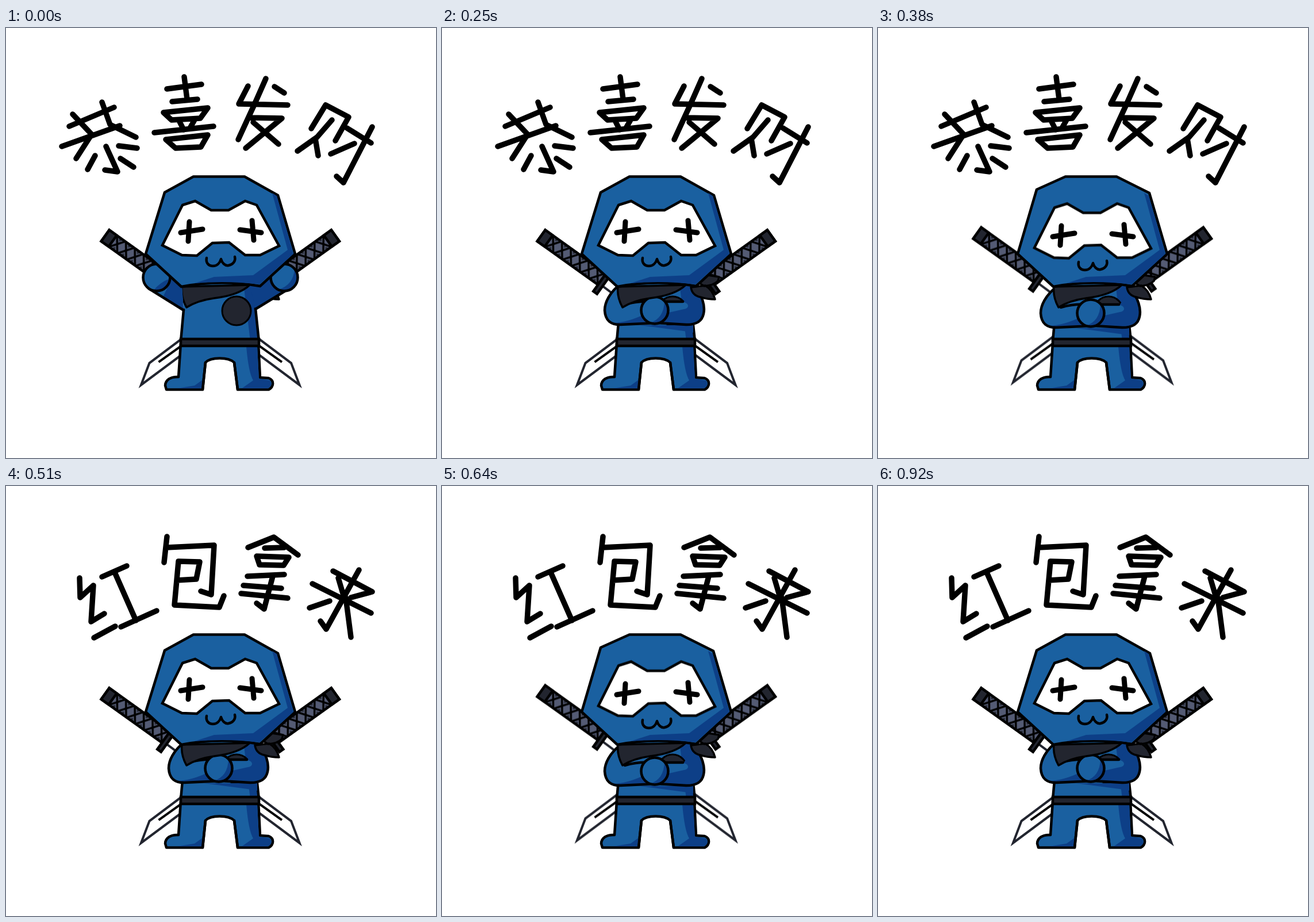
An HTML page that plays this animation: 748 px wide and 748 px high, repeating every 1.02 s.

```html
<!DOCTYPE html>
<html lang="zh">
<head>
<meta charset="utf-8">
<title>恭喜发财</title>
<style>
  html, body { margin: 0; width: 100%; height: 100%; overflow: hidden; background: #fff; }
  svg { display: block; width: 100vw; height: 100vh; }

  .blue { fill: #1a60a0; }
  .navy { fill: #0d3f87; stroke: none; }
  .dark { fill: #22252f; }
  .white { fill: #fff; }
  .line { fill: none; }
  .ink { stroke: #000; stroke-width: 4.5; stroke-linejoin: round; stroke-linecap: round; }
  .bare { stroke: none; }
  .sharp { stroke-linejoin: miter; }
  .blade { fill: #fff; stroke: #22252f; stroke-width: 4; stroke-linejoin: miter; }
  .brush { fill: none; stroke: #000; stroke-width: 9.5; stroke-linecap: round; stroke-linejoin: round; }
  .eyes { stroke-width: 9; }

  /* Hard cuts between poses and captions */
  .raised, .crossed, .wish, .ask, .rest, .dip, .bob { animation: 1020ms step-end infinite; }
  .raised { animation-name: raised; }
  .crossed { animation-name: crossed; }
  .wish { animation-name: wish; }
  .ask { animation-name: ask; }
  .rest { animation-name: rest; }
  .dip { animation-name: dip; }
  .bob { animation-name: bob; }

  @keyframes raised { 0% { opacity: 1 } 24.5098%, 100% { opacity: 0 } }
  @keyframes crossed { 0% { opacity: 0 } 24.5098%, 100% { opacity: 1 } }
  @keyframes wish { 0% { opacity: 1 } 50%, 100% { opacity: 0 } }
  @keyframes ask { 0% { opacity: 0 } 50%, 100% { opacity: 1 } }
  @keyframes rest {
    0%, 50%, 75.4902%, 100% { opacity: 1 }
    37.2549%, 62.7451% { opacity: 0 }
  }
  @keyframes dip {
    0%, 50%, 75.4902%, 100% { opacity: 0 }
    37.2549%, 62.7451% { opacity: 1 }
  }
  @keyframes bob {
    0%, 50%, 75.4902%, 100% { transform: translateY(0) }
    37.2549%, 62.7451% { transform: translateY(var(--shift)) }
  }
</style>
</head>
<body>
<svg viewBox="0 0 748 748">
  <defs>
    <pattern id="wrap" x="18" y="-13" width="19" height="26" patternUnits="userSpaceOnUse">
      <path d="M0 0H19V26H0Z" fill="#545b74"/>
      <path d="M4 0H15L9.5 7ZM4 26H15L9.5 19Z" fill="#22252f"/>
      <path d="M0 0L19 26M0 26L19 0" stroke="#000" stroke-width="3.5"/>
    </pattern>
    <g id="sword" transform="translate(171 360) rotate(35.6)">
      <path class="blade" d="M130 -14L394 -8L428 14.5L130 9Z"/>
      <path class="line" d="M300 0H380" stroke="#000" stroke-width="4"/>
      <path class="ink sharp" fill="url(#wrap)" d="M2 -12H132V12H2Z"/>
      <path class="ink sharp dark" d="M2 -12H18V12H2Z"/>
      <path class="ink sharp dark" d="M132 -26H140V26H132Z"/>
    </g>
  </defs>

  <g class="brush wish" role="img" aria-label="恭喜发财">
    <path d="M110 171L188 138M116 150L149 185L122 227M167 129L181 168L226 190M97 206L198 170
      M155 222L142 246M174 206L194 250L172 247M196 205L228 209M199 227L222 242"/>
    <path d="M310 85L315 124M280 106L340 98M289 128L333 124M274 147L351 139L338 157L288 160Z
      M302 163L309 177M328 160L320 174M258 182L361 171M278 194L351 186L339 207L295 209Z"/>
    <path d="M421 101L405 132L490 134M452 88L433 131L404 194M467 102L484 113
      M424 156L480 157L417 209M430 164L474 202"/>
    <path d="M531 175L556 134L596 155L573 196M567 160L541 190L507 214M538 192L543 222
      M593 174L635 200M637 172L587 269L575 258M606 201L565 219"/>
  </g>

  <g class="brush ask" role="img" aria-label="红包拿来">
    <path d="M128 160L129 194L152 173L148 236L171 222M153 264L190 244
      M167 158L210 139M189 150L226 234M200 245L262 217"/>
    <path d="M280 88L275 133M279 107L362 103L357 189L339 183
      M297 164L331 162L337 132L300 131L293 207L371 211L379 191"/>
    <path d="M421 107L466 89L508 120M450 108L484 107M436 122L492 124L483 138L441 137Z
      M420 157L484 154M413 173L479 178M409 187L490 195M464 157L449 214L436 204"/>
    <path d="M569 148L637 184L600 194M614 146L557 249L547 235M578 160L586 187
      M533 170L635 221M563 200L528 212M591 194L600 263"/>
  </g>

  <g class="bob" style="--shift: -4.5px">
    <use href="#sword"/>
    <use href="#sword" transform="translate(745.5 0) scale(-1 1)"/>
  </g>

  <!-- Body -->
  <path class="blue bare" d="M306 445H432L434 489L440 545H304L309 490Z"/>
  <path class="navy" d="M414 452L436 445L434 489L440 545H425Z"/>
  <path class="ink line" d="M309 490L304 545M434 488L440 545"/>
  <path class="ink blue" d="M304 548L300 607C287 606 277 612 277 622L279 629H342L347 582
    C356 572 387 572 397 582L403 629H457C466 624 467 613 457 609L442 608L439 548Z"/>
  <path class="navy" d="M418 554H437L440 610L459 613C464 619 461 625 455 627H410L430 613Q422 600 418 554Z
    M297 627L328 622L342 612L340 627Z"/>
  <path class="ink line" d="M347 582L342 629M397 582L403 629"/>
  <path class="ink sharp dark" d="M304 541H440V553H304Z"/>

  <circle class="ink dark" cx="401" cy="492" r="25" style="stroke-width: 3"/>

  <g class="crossed">
    <g class="bob" style="--shift: 5px">
      <path class="navy" d="M345 517H437V530L420 527Z"/>
      <path class="navy" d="M387 476H421L438 448C453 464 458 484 455 497C452 512 440 516 425 516H380Z"/>
      <path class="blue bare" d="M387 477H420C430 478 431 488 421 489L390 496Z"/>
      <path class="blue bare" d="M312 444C291 460 283 478 283 491C284 508 292 516 310 516L375 514V475L318 484Z"/>
      <path class="navy" d="M296 513C315 513 335 506 348 500L372 514L310 516Z"/>
      <path class="ink line" d="M312 444C291 460 283 478 283 491C284 508 292 516 310 516L375 513L425 516
        C440 516 452 512 455 497C458 484 453 464 438 448M318 481Q340 475 360 476M386 476H419"/>
      <circle class="blue bare" cx="370" cy="491" r="23.5"/>
      <path class="navy" d="M387 475A23.5 23.5 0 0 1 361 513Q386 506 387 475Z"/>
      <circle class="ink line" cx="370" cy="491" r="23.5"/>
    </g>
  </g>

  <!-- Scarf and its knot -->
  <path class="ink dark" d="M306 450Q304 468 314 486Q333 474 362 470Q405 465 424 447Z" style="stroke-width: 3.5"/>
  <path class="ink dark" d="M448 444L463 430L482 433L480 440Q472 448 456 449Z
    M433 451Q435 465 449 468Q462 472 475 472Q471 456 458 448Z" style="stroke-width: 3.5"/>

  <g class="raised">
    <path class="blue bare" d="M248 453L309 491L306 448L285 434Z"/>
    <path class="navy" d="M274 466L309 491L306 450L288 437Z"/>
    <path class="navy" d="M493 453L434 489L424 447L460 432Z"/>
    <path class="ink line" d="M248 453L309 491M493 453L434 489"/>
    <circle class="blue bare" cx="262" cy="434" r="23.5"/>
    <path class="navy" d="M285 436A23.5 23.5 0 0 1 256 457Q268 442 285 436Z"/>
    <circle class="ink line" cx="262" cy="434" r="23.5"/>
    <circle class="blue bare" cx="484" cy="434" r="23.5"/>
    <path class="navy" d="M502 419A23.5 23.5 0 0 1 474 455Q500 447 502 419Z"/>
    <circle class="ink line" cx="484" cy="434" r="23.5"/>
  </g>

  <!-- Head -->
  <path class="ink blue rest" d="M326 258.5H415L473 291L503 393L442 449Q373 437 305 450L243 393L276 286Z"/>
  <path class="ink blue dip" d="M326 258.5H415L472 287L503 393L442 449Q373 437 305 450L243 393L276 281Z"/>
  <path class="navy" d="M463 287L471 292L500 393L441 446Q385 439 328 444L362 433L430 430L490 386Z"/>

  <path class="ink white sharp bob" style="--shift: 4.5px" d="M307 308L329 301L357 317H387L416 301L436 308
    L475 379L442 395L416 395L388 373L359 374L332 396L306 395L272 378Z"/>
  <g class="ink line bob" style="--shift: 7px">
    <path class="eyes" d="M304 356L342 350M319 337L317 371M407 351L444 356M428 335L431 369"/>
    <path d="M349 400C347 409 353 414 360 414C367 414 372 409 374 402C376 409 381 414 387 413C394 412 400 406 398 398"/>
  </g>
</svg>
</body>
</html>
```
